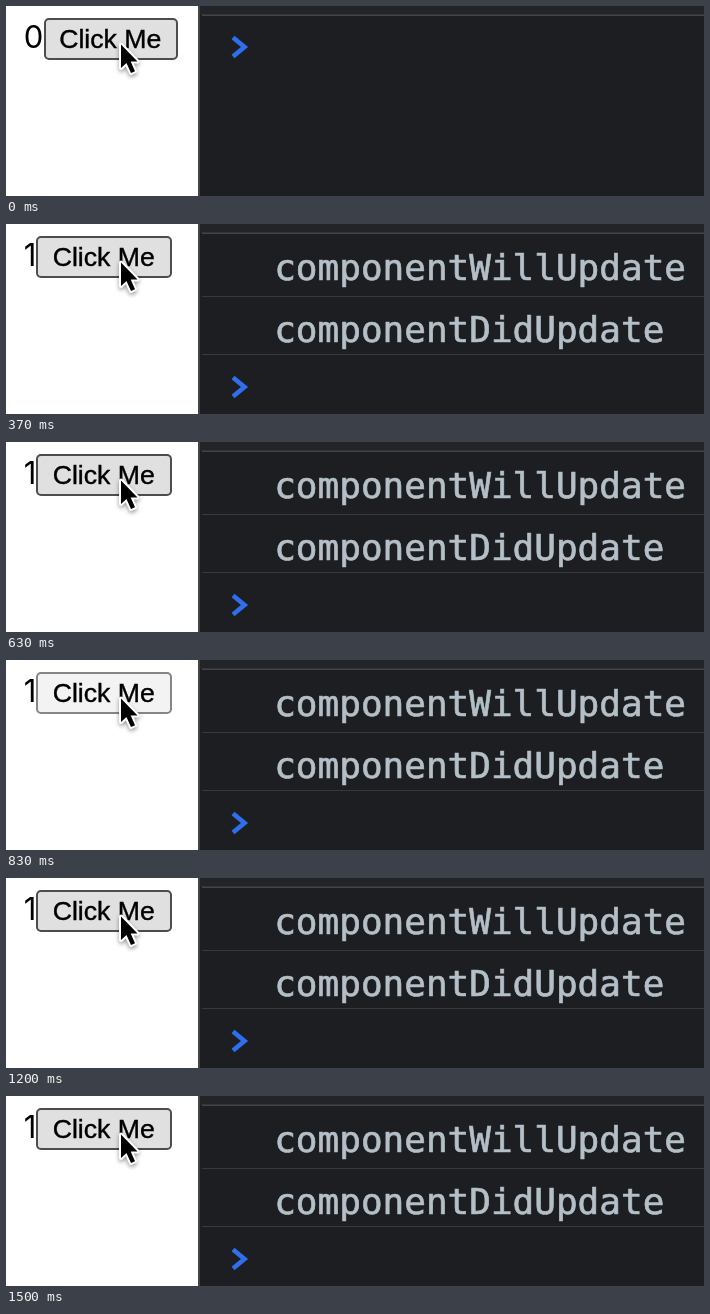
An HTML page that plays this animation: 698x190 px, repeating every 1760 ms.

```html
<!DOCTYPE html>
<html lang="en">
<head>
<meta charset="utf-8">
<title>Click counter and console</title>
<style>
  html, body { margin: 0; width: 100%; height: 100%; overflow: hidden; background: #fff; }
  svg { display: block; width: 698px; height: 190px; }
  #count { font: 31px Inter, sans-serif; text-anchor: middle; }
  #label { font: 26.67px "Liberation Sans", Arial, sans-serif; stroke: #000; stroke-width: .4; }
  #log text { font: 36px "DejaVu Sans Mono", monospace; fill: #b4bfc7; stroke: #b4bfc7; stroke-width: .7; }
  #button { fill: #e0e0e0; stroke: #4d4d4d; stroke-width: 2; }
  #button.pressed { fill: #f3f3f3; stroke: #868686; }
  #cursor { stroke: #fff; stroke-width: 4; stroke-linejoin: round; paint-order: stroke;
    filter: drop-shadow(0 2px 2px rgba(0, 0, 0, .4)); }
</style>
</head>
<body>
<svg viewBox="0 0 698 190">
  <rect x="192" width="506" height="190" fill="#1d1e21"/>
  <rect x="194" width="504" height="9" fill="#232427"/>
  <rect x="192" width="2" height="190" fill="#434447"/>
  <rect x="196" y="8.5" width="502" height="1.5" fill="#434447"/>
  <g id="log">
    <text x="268.2" y="56">componentWillUpdate</text>
    <text x="268.2" y="118">componentDidUpdate</text>
    <path d="M196 72.5H698M196 130.5H698" stroke="#38393c"/>
  </g>
  <path id="prompt" d="M227-9.5 238.5 0 227 9.5" fill="none" stroke="#2f6fee" stroke-width="4.6"/>
  <text id="count" y="42"></text>
  <rect id="button" y="13" height="40" rx="4"/>
  <text id="label" y="41.5">Click Me</text>
  <path id="cursor" d="M115 38.5V62L120.5 57 125 67 129 65.2 124.7 55.5H131.5Z"/>
</svg>
<script>
  const LOOP = 1760, UPDATED = 370;
  const presses = [[300, 370], [800, 900], [1100, 1200], [1400, 1500]];
  const el = id => document.getElementById(id);
  const set = (id, attrs) => {
    for (const name in attrs) el(id).setAttribute(name, attrs[name]);
  };

  function draw(now) {
    const t = now % LOOP;
    const updated = t >= UPDATED;
    const pressed = presses.some(([down, up]) => t >= down && t < up);

    el("count").textContent = updated ? 1 : 0;
    set("count", { x: updated ? 24 : 27.5 });
    set("button", {
      x: updated ? 31 : 39,
      width: updated ? 134 : 132,
      class: pressed ? "pressed" : ""
    });
    set("label", { x: updated ? 46.7 : 53.2 });
    set("log", { visibility: updated ? "visible" : "hidden" });
    set("prompt", { transform: `translate(0 ${updated ? 163 : 41})` });
  }

  const start = performance.now();
  function tick() {
    draw(performance.now() - start);
    requestAnimationFrame(tick);
  }
  tick();
</script>
</body>
</html>
```
